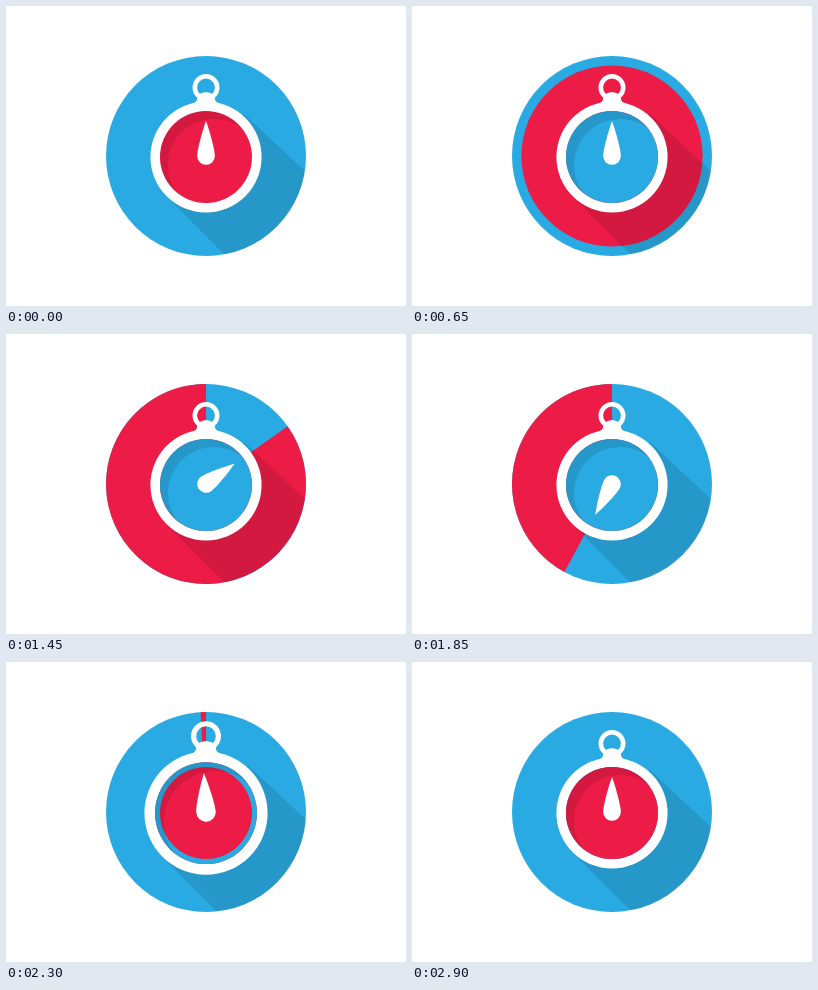
An HTML page with a canvas for the animation above (3750 ms loop, 400 px wide and 300 px high).

```html
<!DOCTYPE html>
<html lang="en">
<head>
<meta charset="utf-8">
<title>Stopwatch</title>
<style>
html, body { margin: 0; width: 100%; height: 100%; overflow: hidden; background: #fff; }
canvas { display: block; }
</style>
</head>
<body>
<canvas id="stage" width="400" height="300"></canvas>
<script>
const ctx = document.getElementById('stage').getContext('2d');
const LOOP = 3750, BLUE = '#29aae2', RED = '#ed1c47', SHADE = 'rgba(0,0,0,.11)';
const CX = 200, CY = 150, DISC = 100, FACE = 46, TAU = Math.PI * 2;

const progress = (t, from, to) => Math.min(1, Math.max(0, (t - from) / (to - from)));
const smooth = u => u * u * (3 - 2 * u);
const easeOut = u => 1 - (1 - u) ** 3;

// Slow start, brisk finish: solves a cubic Bezier with handles (.74, 0) and (.59, 1).
function sweepEase(u) {
  let lo = 0, hi = 1;
  for (let i = 0; i < 24; i++) {
    const s = (lo + hi) / 2, r = 1 - s;
    const x = 3 * 0.74 * s * r * r + 3 * 0.59 * s * s * r + s ** 3;
    if (x < u) lo = s; else hi = s;
  }
  return smooth(lo);
}

function circle(x, y, r, color) {
  ctx.beginPath();
  ctx.arc(x, y, r, 0, TAU);
  ctx.fillStyle = color;
  ctx.fill();
}

function scaled(k, draw) {
  ctx.save();
  ctx.translate(CX, CY);
  ctx.scale(k, k);
  draw();
  ctx.restore();
}

// The disc colour that remains ahead of the hand
function sector(angle, r) {
  if (angle >= TAU || r <= 0) return;
  ctx.beginPath();
  if (angle > 0) ctx.moveTo(CX, CY);
  ctx.arc(CX, CY, r, angle - TAU / 4, TAU * 0.75);
  ctx.closePath();
  ctx.fillStyle = RED;
  ctx.fill();
}

function longShadow(k) {
  ctx.save();
  ctx.beginPath();
  ctx.arc(CX, CY, DISC, 0, TAU);
  ctx.clip();
  scaled(k, () => {
    ctx.beginPath();
    ctx.moveTo(38, -42);
    ctx.lineTo(145, 58);
    ctx.lineTo(145, 145);
    ctx.lineTo(65, 145);
    ctx.lineTo(-40, 40);
    ctx.fillStyle = SHADE;
    ctx.fill();
  });
  ctx.restore();
}

function crown() {
  ctx.beginPath();
  ctx.arc(0, -68.5, 11.2, 0, TAU);
  ctx.lineWidth = 4.6;
  ctx.strokeStyle = '#fff';
  ctx.stroke();
  ctx.beginPath();
  ctx.moveTo(-9, -57);
  ctx.bezierCurveTo(-9, -66, 9, -66, 9, -57);
  ctx.quadraticCurveTo(9, -54, 14, -52);
  ctx.lineTo(-14, -52);
  ctx.quadraticCurveTo(-9, -54, -9, -57);
  ctx.fillStyle = '#fff';
  ctx.fill();
}

function innerShade() {
  ctx.save();
  ctx.beginPath();
  ctx.arc(0, 1, FACE, 0, TAU);
  ctx.clip();
  ctx.beginPath();
  ctx.rect(-60, -60, 120, 120);
  ctx.arc(8, 9, FACE, 0, TAU);
  ctx.fillStyle = SHADE;
  ctx.fill('evenodd');
  ctx.restore();
}

function hand(angle) {
  ctx.save();
  ctx.rotate(angle);
  ctx.beginPath();
  ctx.moveTo(0, -35);
  ctx.bezierCurveTo(3, -27, 8.8, -7, 8.8, 0);
  ctx.arc(0, 0, 8.8, 0, Math.PI);
  ctx.bezierCurveTo(-8.8, -7, -3, -27, 0, -35);
  ctx.fillStyle = '#fff';
  ctx.fill();
  ctx.restore();
}

function draw(t) {
  const angle = TAU * sweepEase(progress(t, 800, 2400));
  const spread = smooth(progress(t, 50, 880));
  const blueFace = FACE * easeOut(progress(t, 50, 550));
  const redFace = FACE * easeOut(progress(t, 2080, 2300));
  const pulse = 1 + 0.108 * (smooth(progress(t, 2080, 2300)) - smooth(progress(t, 2300, 2850)));

  ctx.fillStyle = '#fff';
  ctx.fillRect(0, 0, 400, 300);
  circle(CX, CY, DISC, BLUE);
  sector(angle, 50 + 50 * spread);
  longShadow(pulse);

  scaled(pulse, () => {
    crown();
    circle(0, 1, 55.6, '#fff');
    circle(0, 1, FACE, RED);
    circle(0, 1, blueFace, BLUE);
  });
  if (redFace > 0) {
    if (t > 2850) scaled(1, () => circle(0, 1, FACE, RED));
    else circle(CX, CY + 1, redFace, RED);
  }
  scaled(pulse, () => {
    innerShade();
    hand(angle);
  });
}

function frame() {
  // The clock advances in the steps of a 20 fps loop.
  draw(Math.floor(performance.now() % LOOP / 50) * 50);
  requestAnimationFrame(frame);
}
frame();
</script>
</body>
</html>
```
